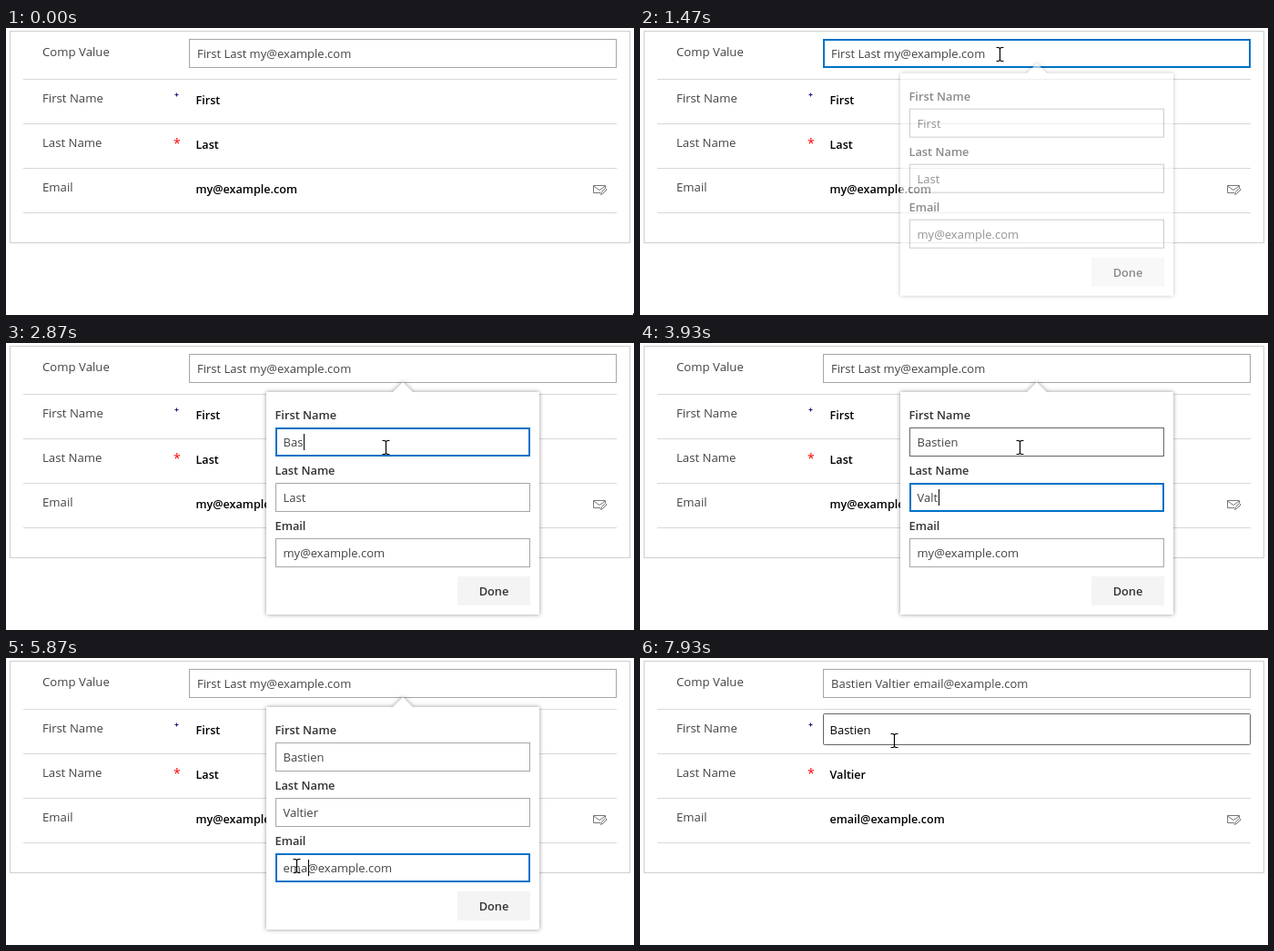
An HTML page that plays this animation: 690x316 px, repeating every 8 s.

```html
<!DOCTYPE html>
<html lang="en">
<head>
<meta charset="utf-8">
<title>Composite field form</title>
<style>
  html, body { margin: 0; width: 100%; height: 100%; overflow: hidden; background: #fff; }
  svg { display: block; width: 690px; height: 316px; }
  text { font: 13px "Open Sans", "Noto Sans", sans-serif; fill: #444; white-space: pre; }
  text.label { font-size: 13.2px; }
  text.value { font-size: 12.6px; font-weight: 600; fill: #000; }
  text.value.editing { font-size: 13px; font-weight: 400; }
  text.strong { font-size: 12.8px; font-weight: 600; fill: #333; }
  .callout { filter: drop-shadow(0 0 2.5px rgba(0, 0, 0, .42)); }
</style>
</head>
<body>
<svg id="stage" viewBox="0 0 690 316" xmlns="http://www.w3.org/2000/svg"></svg>
<script>
const LOOP = 8000, STEP = 1000 / 15;
const BLUE = '#0072c6';
const FIRST = 'Bastien', LAST = 'Valtier', DOMAIN = '@example.com';
const stage = document.getElementById('stage');

function add(parent, tag, attrs = {}, text) {
  const el = document.createElementNS('http://www.w3.org/2000/svg', tag);
  set(el, attrs);
  if (text !== undefined) el.textContent = text;
  parent.appendChild(el);
  return el;
}

function set(el, attrs) {
  for (const key in attrs) el.setAttribute(key, attrs[key]);
}

const show = (el, on) => el.setAttribute('visibility', on ? 'inherit' : 'hidden');

function makeBox(parent, x, y, w, h) {
  const el = add(parent, 'rect', { fill: '#fff' });
  return { el, x, y, w, h };
}

function drawBox(box, focused, hovered) {
  const line = focused ? 2 : 1;
  set(box.el, {
    x: box.x + line / 2, y: box.y + line / 2,
    width: box.w - line, height: box.h - line,
    'stroke-width': line,
    stroke: focused ? BLUE : hovered ? '#666' : '#a6a6a6'
  });
}

const inside = (p, b) => p.x >= b.x && p.x <= b.x + b.w && p.y >= b.y && p.y <= b.y + b.h;

// Form
add(stage, 'rect', { width: 690, height: 316, fill: '#fff' });
add(stage, 'rect', { x: 4.5, y: 3.5, width: 681, height: 233, fill: '#fff', stroke: '#cfcfcf' });
for (let i = 0; i < 4; i++) {
  add(stage, 'path', { d: `M19 ${56.5 + 49 * i}H671`, stroke: '#d8d8d8' });
}
add(stage, 'text', { x: 40, y: 31, class: 'label' }, 'Comp Value');
const compBox = makeBox(stage, 201, 12, 470, 32);
const compText = add(stage, 'text', { x: 210, y: 33 });

const rows = ['First Name', 'Last Name', 'Email'].map((name, i) => {
  const y = 61 + 49 * i;
  add(stage, 'text', { x: 40, y: y + 21, class: 'label' }, name);
  const box = makeBox(stage, 201, y, 470, 35);
  set(box.el, { rx: 1 });
  return { box, text: add(stage, 'text', { x: 208.5, y: y + 23 }) };
});
add(stage, 'path', { d: 'M185.5 73.5h4M187.5 71.5v4', stroke: '#1a1a80' });
add(stage, 'text', { x: 184, y: 132, style: 'fill:#f00;font-size:14px' }, '*');
add(stage, 'path', {
  d: 'M653 181.5H645.5V173.5H658.5V176M645.5 174L652 178.5L658.5 174M653.5 183.5l1-3l4-4l1.5 1.5l-4 4z',
  fill: 'none', stroke: '#777'
});

// Callout
const callout = add(stage, 'g');
add(callout, 'path', { d: 'M286 54H425L436 43L447 54H586V299H286Z', fill: '#fff', class: 'callout' });
const fields = ['First Name', 'Last Name', 'Email'].map((name, i) => {
  const y = 93 + 61 * i;
  add(callout, 'text', { x: 295.5, y: y - 9, class: 'strong' }, name);
  return {
    box: makeBox(callout, 296, y, 280, 32),
    mark: add(callout, 'rect', { x: 305, y: y + 7, height: 18, fill: '#0078d7' }),
    text: add(callout, 'text', { x: 304.5, y: y + 21 }),
    caret: add(callout, 'rect', { y: y + 7, width: 1, height: 18, fill: '#000' })
  };
});
const button = { x: 496, y: 257, w: 80, h: 32 };
button.el = add(callout, 'rect', { x: 496, y: 257, width: 80, height: 32 });
button.ring = add(callout, 'rect', {
  x: 496.5, y: 257.5, width: 79, height: 31, fill: 'none', stroke: '#222', 'stroke-dasharray': '1 1'
});
add(callout, 'text', { x: 536, y: 278, class: 'strong', 'text-anchor': 'middle' }, 'Done');

// Pointer shapes, each with its hot spot at 0,0
const pointers = {
  beam: { d: 'M-3.5-7.5H-1L.5-6.5L2-7.5H4.5M.5-6.5V6.5M-3.5 7.5H-1L.5 6.5L2 7.5H4.5', fill: 'none', stroke: '#000', 'stroke-width': 1.2 },
  arrow: { d: 'M.5.5V16.5L4.2 13L6.6 18.5L9 17.5L6.6 12.2H11.7Z', fill: '#fff', stroke: '#000' },
  hand: {
    d: 'M-1.5 1.5Q0-.8 1.5 1.5V7Q3 5.6 4.5 7.3Q6 6.2 7.3 8Q9 7 10 9V14Q10 17 8 19V21.5H.5V19.5L-5.5 11.5Q-5.5 9-3.5 10L-1.5 12.2Z M1.5 7V10.5M4.5 7.5V10.5M7.3 8.2V11',
    fill: '#fff', stroke: '#000', 'stroke-width': 1.1
  }
};
for (const kind in pointers) pointers[kind] = add(stage, 'path', pointers[kind]);

// Time, x, y
const route = [
  [400, 689, 314], [870, 328, 65], [1200, 395, 28], [1600, 395, 30],
  [1670, 392, 40], [1870, 417, 115], [4670, 417, 115], [4730, 319, 229],
  [6400, 319, 229], [6800, 533, 258], [7130, 533, 258], [7470, 259, 95],
  [7600, 259, 95], [7930, 279, 91]
];

function pointerAt(t) {
  const next = route.findIndex(stop => stop[0] > t);
  if (next === 0) return { x: route[0][1], y: route[0][2] };
  if (next < 0) return { x: 279, y: 91 };
  const [t0, x0, y0] = route[next - 1], [t1, x1, y1] = route[next];
  const k = (t - t0) / (t1 - t0);
  return { x: Math.round(x0 + (x1 - x0) * k), y: Math.round(y0 + (y1 - y0) * k) };
}

const passed = (t, times) => times.filter(time => t >= time).length;
const typed = (t, times, before, after) => after.slice(0, passed(t, times)) || before;

const firstKeys = [2670, 2800, 2870, 2930, 3070, 3130, 3200];
const lastKeys = [3600, 3670, 3800, 3930, 4000, 4130, 4200];
const emailKeys = [5200, 5330, 5530, 5670, 5800, 5930, 6000];
const emailStarts = ['my', 'y', '', 'e', 'em', 'ema', 'emai', 'email'];

function drawField(field, content, focused, selected, caretAt, hovered) {
  drawBox(field.box, focused, hovered);
  field.text.textContent = content;
  field.text.style.fill = selected ? '#fff' : '#444';
  show(field.mark, selected);
  if (selected) set(field.mark, { width: field.text.getComputedTextLength() });
  show(field.caret, focused && !selected);
  if (focused && !selected) {
    const width = caretAt ? field.text.getSubStringLength(0, caretAt) : 0;
    set(field.caret, { x: Math.round(305 + width) });
  }
}

function render(t) {
  const p = pointerAt(t);
  const open = t >= 1470 && t < 7000;
  const saved = t >= 7000;
  const over = box => inside(p, box);
  const overCallout = open && over({ x: 286, y: 54, w: 300, h: 245 });

  compText.textContent = saved ? `${FIRST} ${LAST} email${DOMAIN}` : `First Last my${DOMAIN}`;
  drawBox(compBox, t >= 1330 && t < 2070, over(compBox));

  const values = saved ? [FIRST, LAST, 'email' + DOMAIN] : ['First', 'Last', 'my' + DOMAIN];
  rows.forEach(({ box, text }, i) => {
    const hovered = !overCallout && over(box);
    show(box.el, hovered);
    drawBox(box, false, hovered);
    text.textContent = values[i];
    text.setAttribute('class', hovered ? 'value editing' : 'value');
  });

  show(callout, open);
  if (open) {
    const rest = Math.pow(1 - Math.min(1, (t - 1400) / 370), 4);
    set(callout, { opacity: 1 - rest, transform: `translate(0 ${-10 * rest})` });

    const active = t < 2070 ? -1 : t < 3400 ? 0 : t < 4400 ? 1 : t < 6870 ? 2 : -1;
    const start = emailStarts[passed(t, emailKeys)];
    const contents = [
      typed(t, firstKeys, 'First', FIRST),
      typed(t, lastKeys, 'Last', LAST),
      start + DOMAIN
    ];
    const selected = [t >= 2200 && t < 2670, t >= 3400 && t < 3600, t >= 4400 && t < 4870];
    const carets = [contents[0].length, contents[1].length, t < 5330 ? 0 : start.length];
    fields.forEach((field, i) =>
      drawField(field, contents[i], active === i, selected[i], carets[i], over(field.box)));

    set(button.el, { fill: over(button) ? '#eaeaea' : '#f4f4f4' });
    show(button.ring, t >= 6870);
  }

  const editable = overCallout ? fields : [{ box: compBox }, ...rows];
  const kind = overCallout && over(button) ? 'hand'
    : editable.some(({ box }) => over(box)) ? 'beam' : 'arrow';
  for (const name in pointers) show(pointers[name], name === kind);
  set(pointers[kind], { transform: `translate(${p.x} ${p.y})` });
}

const startTime = performance.now();
function tick() {
  const elapsed = (performance.now() - startTime) % LOOP;
  const step = Math.floor((elapsed + 5) / STEP);
  render(Math.round(step * STEP / 10) * 10);
  requestAnimationFrame(tick);
}
tick();
</script>
</body>
</html>
```
